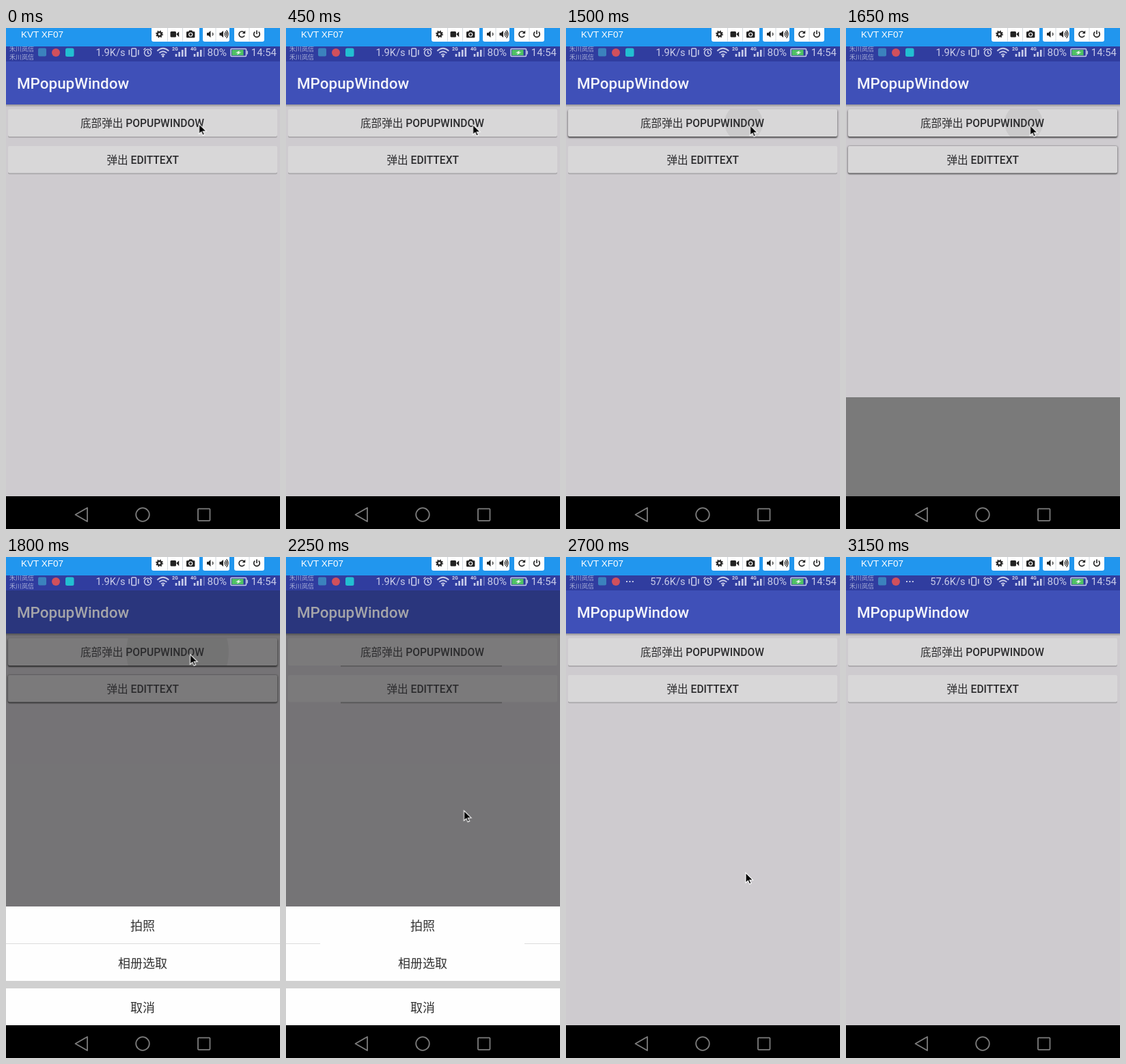
An HTML page for the animation above (3600 ms loop, 401 by 734 pixels).

```html
<!DOCTYPE html>
<html lang="zh-CN">
<head>
<meta charset="utf-8">
<title>MPopupWindow</title>
<style>
html, body { margin: 0; width: 100%; height: 100%; overflow: hidden; background: #000; }
svg { display: block; width: 100%; height: 100%; }
text { font-family: Roboto, "Noto Sans CJK SC", "Noto Sans CJK", sans-serif; }
.device { font: 13.5px "Liberation Sans", sans-serif; fill: #fff; }
.carrier { font-size: 9px; fill: #a9afd8; }
.status { font-size: 14.6px; fill: #c9cdea; }
.net { font-size: 7px; font-weight: 700; fill: #d5d8ee; }
.title { font-size: 22.4px; font-weight: 500; fill: #f4f4fa; }
.label { font-size: 15.6px; font-weight: 500; fill: #2b2b2d; }
.item { font-size: 18px; fill: #333; text-anchor: middle; }
.line { fill: none; stroke: #c9cdea; stroke-width: 1.5; }
.ink { fill: none; stroke: #222; stroke-width: 1.6; }
.nav { fill: none; stroke: #7c7c7c; stroke-width: 1.8; }

.cursor, .ripple, .lift1, .lift2, .edge, .edge-mid, .dim, .rise, .sheet, .rule, .before, .after {
  animation: 3.6s step-end infinite;
}
.cursor { animation-name: cursor; }
.ripple { animation-name: ripple; }
.lift1 { animation-name: lift1; }
.lift2 { animation-name: lift2; }
.edge { animation-name: edge; }
.edge-mid { animation-name: edge-mid; }
.dim, .sheet { animation-name: open; }
.rise { animation-name: rise; }
.rule { animation-name: rule; }
.before { animation-name: before; }
.after { animation-name: after; }

@keyframes cursor {
  0% { transform: translate(282.5px, 140px); }
  12.49% { transform: translate(273.5px, 141px); }
  33.33% { transform: translate(270.5px, 141px); }
  37.49% { transform: translate(269.5px, 142px); }
  62.49% { transform: translate(260.5px, 371px); }
  74.99% { transform: translate(263px, 462px); }
  79.16% { transform: translate(287.5px, 706px); }
  83.33% { transform: translate(298.5px, 710px); }
  87.49%, 100% { transform: translate(-40px, 0); }
}
@keyframes ripple {
  0% { transform: scale(0); }
  41.66% { transform: translate(260px, 139px) scale(28); }
  49.99% { transform: translate(251px, 139px) scale(75); }
  54.16% { transform: translate(200px, 139px) scale(150); }
  58.33%, 100% { transform: scale(0); }
}
@keyframes lift1 { 0%, 58.33%, 100% { opacity: 0; } 41.66% { opacity: 1; } }
@keyframes lift2 { 0%, 58.33%, 100% { opacity: 0; } 45.83% { opacity: 1; } }
@keyframes edge { 0%, 70.83%, 100% { opacity: 1; } 58.33% { opacity: 0; } }
@keyframes edge-mid { 0%, 70.83%, 100% { opacity: 0; } 58.33% { opacity: 1; } }
@keyframes open { 0%, 70.83%, 100% { opacity: 0; } 49.99% { opacity: 1; } }
@keyframes rise {
  0%, 49.99%, 74.99%, 100% { transform: translateY(686px); }
  45.83% { transform: translateY(541px); }
  70.83% { transform: translateY(381px); }
}
@keyframes rule { 0%, 100% { opacity: 1; } 54.16% { opacity: 0; } }
@keyframes before { 0% { opacity: 1; } 74.99%, 100% { opacity: 0; } }
@keyframes after { 0% { opacity: 0; } 74.99%, 100% { opacity: 1; } }
</style>
</head>
<body>
<svg viewBox="0 0 401 734">
  <defs>
    <clipPath id="btnClip"><rect x="3" y="119" width="394" height="40" rx="2"/></clipPath>
    <linearGradient id="barShadow" x2="0" y2="1">
      <stop stop-opacity=".28"/><stop offset="1" stop-opacity="0"/>
    </linearGradient>
    <filter id="soft" x="-5%" y="-20%" width="110%" height="150%"><feGaussianBlur stdDeviation="1.3"/></filter>
    <path id="bars" d="M0 42v-4m4.6 4v-7m4.6 7v-10"/>
    <path id="speaker" d="M0 7h2.3l3.2-3v10l-3.2-3H0z"/>
  </defs>

  <!-- page -->
  <rect y="112" width="401" height="574" fill="#cecbcf"/>
  <rect y="112" width="401" height="4" fill="url(#barShadow)"/>
  <g class="edge" fill="#a9a7aa">
    <rect x="3" y="121" width="394" height="39.7" rx="2"/>
    <rect x="3" y="175" width="394" height="39.3" rx="2"/>
  </g>
  <g class="edge-mid" fill="#99979a">
    <rect x="80" y="158" width="236" height="2.5"/>
    <rect x="80" y="212" width="236" height="2.3"/>
  </g>
  <g filter="url(#soft)" fill="#000" fill-opacity=".5">
    <rect class="lift1" x="2.5" y="120" width="395" height="41" rx="3"/>
    <rect class="lift2" x="2.5" y="173" width="395" height="41" rx="3"/>
  </g>
  <g fill="#d8d7d8">
    <rect x="3" y="119" width="394" height="40" rx="2"/>
    <rect x="3" y="173" width="394" height="39.5" rx="2"/>
  </g>
  <g clip-path="url(#btnClip)"><circle class="ripple" r="1" fill="#000" fill-opacity=".06"/></g>

  <!-- app bar -->
  <rect y="49" width="401" height="63" fill="#3f50b8"/>
  <text class="title" x="16" y="89">MPopupWindow</text>
  <g class="dim">
    <rect y="49" width="401" height="63" fill-opacity=".32"/>
    <rect y="112" width="401" height="574" fill-opacity=".43"/>
  </g>
  <text class="label" x="109" y="145">底部弹出 POPUPWINDOW</text>
  <text class="label" x="147.5" y="198.6">弹出 EDITTEXT</text>

  <!-- bottom sheet -->
  <g class="rise"><rect width="401" height="320" fill="#7a7a7a"/></g>
  <g class="sheet">
    <rect y="512" width="401" height="174" fill="#fefefe"/>
    <path d="M0 566.5h50m299 0h52" stroke="#dcdcdc"/>
    <path class="rule" d="M50 566.5h299" stroke="#dcdcdc"/>
    <rect y="621" width="401" height="11" fill="#d0d0d0"/>
    <text class="item" x="200" y="546.5">拍照</text>
    <text class="item" x="200" y="601.5">相册选取</text>
    <text class="item" x="200" y="666.5">取消</text>
  </g>

  <!-- status bar -->
  <rect y="27" width="401" height="22" fill="#303d9f"/>
  <text class="carrier" x="5" y="33.5">禾川岚信</text>
  <text class="carrier" x="5" y="45.8">禾川岚信</text>
  <rect x="47" y="29.5" width="12" height="12" rx="2" fill="#3b82bd"/>
  <circle cx="73" cy="36" r="6" fill="#d0505c"/>
  <g class="before">
    <rect x="87" y="29.5" width="12.5" height="12.5" rx="2.5" fill="#22bfd2"/>
    <text class="status" x="174.5" y="41.3" text-anchor="end">1.9K/s</text>
  </g>
  <g class="after">
    <path d="M88 36h2m2.4 0h2m2.4 0h2" stroke="#c9cdea" stroke-width="1.8"/>
    <text class="status" x="174.5" y="41.3" text-anchor="end">57.6K/s</text>
  </g>
  <g class="line">
    <rect x="183.8" y="30" width="6.6" height="11.5" rx="1"/>
    <path d="M180.3 32v7.5m13.6-7.5v7.5"/>
    <circle cx="207.5" cy="36.3" r="5"/>
    <path d="M207.5 33v3.5l2.2 1.4M201.3 32l3-2.5m6.4 0l3 2.5"/>
    <path d="M221.3 33.6q8.5-7.6 17 0m-14 3q5.500-4.600 11 0m-8.200 2.800q2.700-2 5.400 0" stroke-width="1.8"/>
    <circle cx="229.800" cy="41.300" r=".9"/>
    <g stroke-width="2.600">
      <use href="#bars" x="249"/>
      <path d="M262.800 42v-13"/>
      <use href="#bars" x="276"/>
      <path d="M289.800 42v-13" stroke-width="1.500" stroke-opacity=".45"/>
    </g>
    <rect x="329" y="30.500" width="22.500" height="11" rx="1"/>
    <path d="M353.200 33.500v5"/>
  </g>
  <text class="net" x="243" y="33">2G</text>
  <text class="net" x="270" y="33">4G</text>
  <rect x="330.500" y="32" width="17" height="8" fill="#4fc264"/>
  <path d="M336 36.500l6-3.500-1 2.600h3.500l-6.500 3.700 1.300-2.800z" fill="#eef4ee"/>
  <text class="status" x="294.500" y="41.300" style="font-size:15.400px">80%</text>
  <text class="status" x="358.800" y="41.300" style="font-size:14.900px">14:54</text>

  <!-- mirror toolbar -->
  <rect width="401" height="27" fill="#2196ee"/>
  <text class="device" x="22" y="14">KVT XF07</text>
  <g fill="#fff">
    <rect x="213" y="-4" width="70" height="24" rx="3"/>
    <rect x="288" y="-4" width="39" height="24" rx="3"/>
    <rect x="334" y="-4" width="44" height="24" rx="3"/>
  </g>
  <path d="M236.500 0v19.500m22-19.500v19.500m48.500-19.500v19.500m49-19.500v19.500" stroke="#cfd6dc"/>
  <g class="ink">
    <circle cx="224.500" cy="9" r="2.900" stroke-width="2.200"/>
    <circle cx="224.500" cy="9" r="4.500" stroke-width="1.800" stroke-dasharray="1.770 1.764"/>
    <path d="M302 7q2 2 0 4M319.700 7q2 2 0 4m1.400-6q3.600 4 0 8m1.500-9.800q5 5.800 0 11.600" stroke-width="1.200"/>
    <path d="M348.500 6.500A4.200 4.200 0 1 0 349 11"/>
    <path d="M364.300 5.700a4.300 4.300 0 1 0 5.400 0M367 3.500v5.500"/>
  </g>
  <g fill="#222">
    <rect x="240.500" y="5" width="8.500" height="8.500" rx="1.500"/>
    <path d="M249.200 9l4-3.800v8zM350.200 3.700v4.600h-4.600z"/>
    <path d="M264 6.500q0-1.200 1.200-1.200h2l1-1.800h4l1 1.800h2q1.200 0 1.200 1.200v6.500q0 1.200-1.200 1.200h-10q-1.200 0-1.200-1.200z"/>
    <circle cx="270.200" cy="9.500" r="2.500" stroke="#fff" stroke-width="1.200"/>
    <use href="#speaker" x="294"/>
    <use href="#speaker" x="312.500"/>
  </g>

  <!-- navigation -->
  <rect y="686" width="401" height="48"/>
  <g class="nav" stroke-linejoin="round">
    <path d="M101.500 713l17.500-10v20z"/>
    <circle cx="200" cy="713" r="9.800"/>
    <rect x="281" y="704.300" width="17.500" height="17.500" rx="1"/>
  </g>

  <g class="cursor">
    <path d="M0 .5v14.800l3.400-3.200 2.200 5 2.400-1-2.200-4.900h4.700z" stroke="#fff" stroke-width="1.100"/>
  </g>
</svg>
</body>
</html>
```
